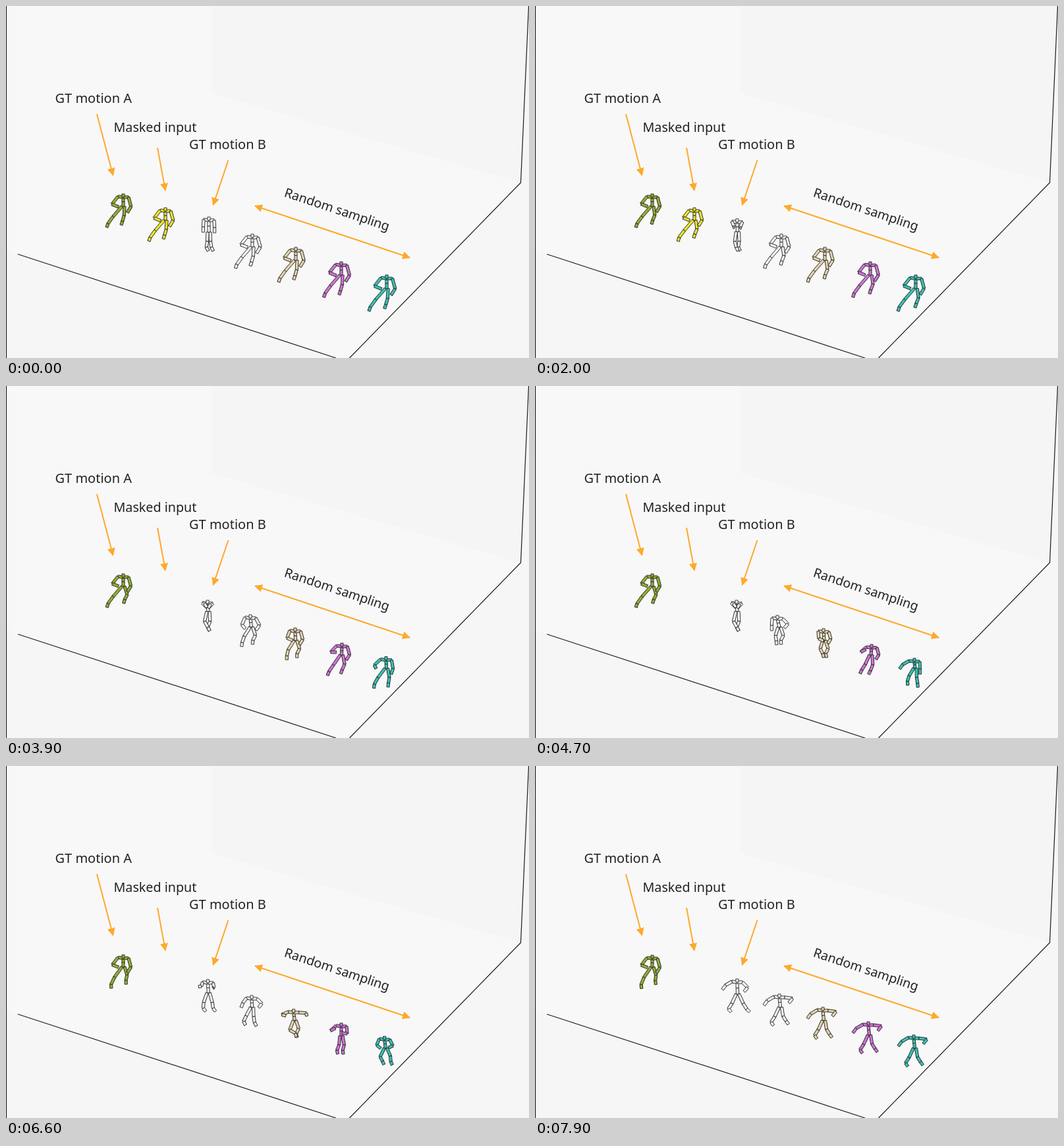
These frames come from a looping animation (794 px wide and 534 px high, 8 s). An HTML page with a canvas:

```html
<!DOCTYPE html>
<html lang="en">
<head>
<meta charset="utf-8">
<title>Motion sampling</title>
<style>
  html, body { margin: 0; width: 100%; height: 100%; overflow: hidden; background: #f6f6f6; }
  svg, canvas { position: absolute; left: 0; top: 0; width: 794px; height: 534px; }
  text { font: 20px "Noto Sans", "Open Sans", sans-serif; fill: #222; }
  .edge { fill: none; stroke: #1a1a1a; stroke-width: 1.2; }
  .arrow { stroke: #fda92b; stroke-width: 2; marker-end: url(#tip); }
  .both { marker-start: url(#tip); }
</style>
</head>
<body>
<svg viewBox="0 0 794 534">
  <defs>
    <marker id="tip" markerUnits="userSpaceOnUse" markerWidth="12" markerHeight="12"
            refX="11" refY="6" orient="auto-start-reverse">
      <path d="M0 0L12 6L0 12Z" fill="#fda92b"/>
    </marker>
  </defs>
  <path d="M0 0H312V132L781 268L521 534H500L18 377L0 371Z" fill="#f8f8f8"/>
  <path d="M312 0H793L781 268L312 132Z" fill="#f5f5f5"/>
  <path class="edge" d="M.5 0V534M18 376.5L501 534M521.5 534L781.5 268L793.5 0"/>
  <text x="74.5" y="146.5">GT motion A</text>
  <text x="163.5" y="191.3" style="font-size:19.7px">Masked input</text>
  <text x="278" y="217.3">GT motion B</text>
  <text transform="translate(500.5 315) rotate(18.4)" text-anchor="middle" style="font-size:19.5px">Random sampling</text>
  <path class="arrow" d="M138 164L162.5 257"/>
  <path class="arrow" d="M230 215L242 280"/>
  <path class="arrow" d="M337.5 234L314.5 302"/>
  <path class="arrow both" d="M378 303.3L613 381.7"/>
</svg>
<canvas id="stage" width="794" height="534"></canvas>
<script>
const LOOP = 8000, STEP = 100, MASK_AT = 3400;
const ctx = document.getElementById('stage').getContext('2d');

// Limb angles in degrees, measured from straight down to the outside
const arms = {
  hip: [38, -68], hang: [15, -32], limp: [3, 0], lift: [-45, 150],
  bow: [44, -40], open: [60, 36], wing: [82, -38], reach: [90, 70],
  fold: [48, -116], cross: [5, -98], tuck: [-4, -64]
};
// Thigh angle, shin angle, length
const legs = {
  long: [41, 36, 1.2], trot: [34, 22, 1.1], short: [-3, -16, 0.82],
  crouch: [18, -27, 0.77], wide: [31, 17, 0.8], plain: [2, 8, 0.83],
  lean: [3, -22, 0.88], step: [25, 32, 0.92], kick: [9, 32, 0.8],
  back: [21, -60, 0.92], slip: [17, -8, 0.76], bent: [13, -30, 0.92]
};

const move = ([x, y], angle, length) => {
  const a = angle * Math.PI / 180;
  return [x + Math.cos(a) * length, y + Math.sin(a) * length];
};

function limb(root, side, [upper, lower], long, short) {
  const joint = move(root, 90 - side * upper, long);
  return [root, joint, move(joint, 90 - side * lower, short)];
}

function pose(armL, armR, legL, legR, { x = -2, y = 2, hip = 20, arm = 0.8, toe = 62 } = {}) {
  const pelvis = [x / 2, hip];
  const leg = (side, shape) => {
    const size = shape[2];
    const points = limb([pelvis[0] + 2 * side, hip], side, shape, 17 * size, 11 * size);
    return [...points, move(points[2], toe, 6)];
  };
  const reach = (side, shape) => limb([x + 8 * side, y + 4.5 + side / 2], side, shape, 14 * arm, 10 * arm);
  return [
    leg(1, legs[legR]), leg(-1, legs[legL]),
    [[x, y + 5], [(x + pelvis[0]) / 2, (y + 5 + hip) / 2], pelvis],
    [[x, y + 5], ...reach(1, arms[armR])],
    [[x, y + 5], ...reach(-1, arms[armL])],
    [[x, y], [x, y + 5]]
  ];
}

const start = pose('hip', 'hang', 'long', 'short', { x: 0, y: 0, hip: 19, arm: 1.06, toe: 108 });
const bend = pose('hip', 'hang', 'long', 'crouch', { x: 0, y: 0, hip: 19, arm: 1, toe: 105 });
const stride = pose('hip', 'hang', 'trot', 'slip', { x: 0, arm: 1, toe: 82 });
const stand = pose('limp', 'limp', 'plain', 'plain', { x: 0, y: 0, hip: 23 });
const raised = pose('lift', 'lift', 'bent', 'lean', { y: 5, hip: 22, arm: 0.7 });
const walk = pose('open', 'bow', 'step', 'step', { x: -1, y: 3, hip: 26, toe: 45 });
const landing = pose('open', 'wing', 'step', 'kick', { x: -3, y: 0, arm: 0.85, toe: 55 });

const motionA = [[600, start], [3100, bend], [4700, bend], [7200, stride]];
const motionB = [[600, stand], [3100, raised], [5900, raised], [7200, walk]];

const scale = (shape, size) => shape.map(line => line.map(point => point.map(v => v * size)));

// A sample follows motion A, then goes its own way
const sample = (size, first, second, third) => [
  [600, scale(start, size)], [3100, scale(bend, size)],
  [4700, first], [5900, second], [7200, third], [7900, landing]
];

const figures = [
  { x: 178, y: 285, color: '#8fae31', keys: motionA },
  { x: 242, y: 306, color: '#ece427', keys: motionA, until: MASK_AT },
  { x: 308, y: 320, color: '#f3f3f3', keys: motionB },
  { x: 374, y: 346, color: '#f3f3f3', keys: sample(1.02,
    pose('limp', 'bow', 'slip', 'crouch', { x: -6, toe: 85 }),
    pose('limp', 'bow', 'wide', 'plain', { arm: 0.7 }),
    pose('open', 'bow', 'step', 'plain', { x: 0 })) },
  { x: 440, y: 366, color: '#e3d2a9', keys: sample(1.04,
    pose('tuck', 'hang', 'crouch', 'crouch', { toe: 75 }),
    pose('fold', 'reach', 'back', 'crouch', { x: -5, y: 4 }),
    pose('wing', 'wing', 'back', 'crouch', { toe: 90 })) },
  { x: 509, y: 388, color: '#cf72d6', keys: sample(1.06,
    pose('fold', 'hang', 'step', 'lean', { x: 2, y: 4, toe: 115 }),
    pose('fold', 'cross', 'plain', 'lean', { x: 0, hip: 23, toe: 100 }),
    pose('fold', 'cross', 'kick', 'slip', { x: 0 })) },
  { x: 578, y: 408, color: '#36c2b3', keys: sample(1.08,
    pose('open', 'limp', 'wide', 'plain', { y: 5, toe: 85 }),
    pose('tuck', 'cross', 'wide', 'wide', { x: -5, toe: 90 }),
    pose('bow', 'bow', 'back', 'slip', { toe: 45 })) }
];

function poseAt(keys, t) {
  const next = keys.findIndex(([time]) => time > t);
  if (next === 0) return keys[0][1];
  if (next < 0) return keys[keys.length - 1][1];
  const [t0, a] = keys[next - 1], [t1, b] = keys[next];
  const k = (t - t0) / (t1 - t0);
  return a.map((line, i) => line.map((point, j) =>
    point.map((v, axis) => v + (b[i][j][axis] - v) * k)));
}

function bone([ax, ay], [bx, by]) {
  ctx.save();
  ctx.translate(ax, ay);
  ctx.rotate(Math.atan2(by - ay, bx - ax));
  ctx.beginPath();
  ctx.rect(0, -2.1, Math.hypot(bx - ax, by - ay), 4.2);
  ctx.fill();
  ctx.stroke();
  ctx.restore();
}

function drawFigure({ x, y, color, keys }, t) {
  ctx.save();
  ctx.translate(x, y);
  ctx.fillStyle = color;
  ctx.strokeStyle = '#2b2b2b';
  ctx.lineWidth = 0.9;
  for (const line of poseAt(keys, t)) {
    for (let i = 1; i < line.length; i++) bone(line[i - 1], line[i]);
  }
  ctx.restore();
}

function frame(now) {
  const t = Math.floor(now % LOOP / STEP) * STEP;
  ctx.clearRect(0, 0, 794, 534);
  for (const figure of figures) {
    if (t < (figure.until ?? LOOP)) drawFigure(figure, t);
  }
  requestAnimationFrame(frame);
}
frame(performance.now());
</script>
</body>
</html>
```
